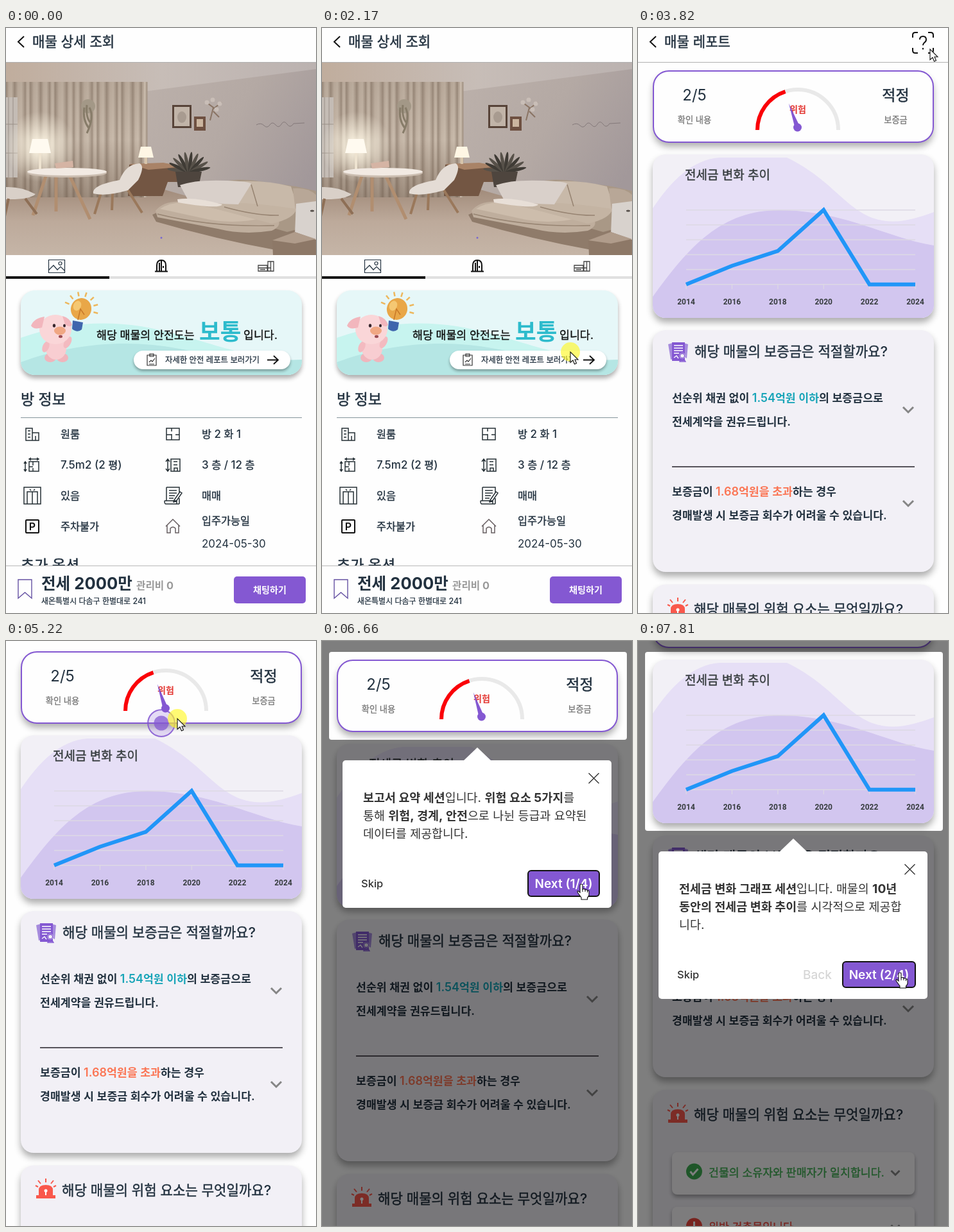
These frames come from a looping animation (483x912 px, 8000 ms). An HTML page with a canvas:

```html
<!DOCTYPE html>
<html lang="ko">
<head>
<meta charset="utf-8">
<style>
html, body { margin: 0; width: 100%; height: 100%; overflow: hidden; background: #fefefe; }
canvas { display: block; width: 483px; height: 912px; }
</style>
</head>
<body>
<canvas id="stage" width="483" height="912"></canvas>
<script>
const W = 483, H = 912, LOOP = 8000;
const INK = '#22313f', PURPLE = '#8458d2', PANEL = '#f2f0f6';
const screen = document.getElementById('stage').getContext('2d');
const layer = document.createElement('canvas');
layer.width = W;
layer.height = H;
const layerCtx = layer.getContext('2d');
let g = screen;

const clamp = v => Math.max(0, Math.min(1, v));
const progress = (t, start, length) => clamp((t - start) / length);
const sine = p => (1 - Math.cos(Math.PI * p)) / 2;

function shape(d, color, x = 0, y = 0) {
  g.save();
  g.translate(x, y);
  g.fillStyle = color;
  g.fill(new Path2D(d));
  g.restore();
}

function line(d, color, width, x = 0, y = 0) {
  g.save();
  g.translate(x, y);
  g.strokeStyle = color;
  g.lineWidth = width;
  g.stroke(new Path2D(d));
  g.restore();
}

function ellipse(x, y, rx, ry, color, turn = 0) {
  g.beginPath();
  g.ellipse(x, y, rx, ry, turn, 0, 7);
  g.fillStyle = color;
  g.fill();
}

function rect(x, y, w, h, color) {
  g.fillStyle = color;
  g.fillRect(x, y, w, h);
}

function gradient(x0, y0, x1, y1, ...colors) {
  const fill = g.createLinearGradient(x0, y0, x1, y1);
  colors.forEach((color, i) => fill.addColorStop(i / (colors.length - 1), color));
  return fill;
}

function box(x, y, w, h, r, fill, shadow = 0, border) {
  g.save();
  g.beginPath();
  g.roundRect(x, y, w, h, r);
  if (shadow) {
    g.shadowColor = 'rgba(0,0,0,.32)';
    g.shadowBlur = shadow * 1.5;
    g.shadowOffsetY = shadow;
  }
  g.fillStyle = fill;
  g.fill();
  g.shadowColor = 'transparent';
  if (border) {
    g.strokeStyle = border;
    g.lineWidth = 2;
    g.stroke();
  }
  g.restore();
}

// Hangul is set slightly smaller than Latin; medium Hangul is regular with a thin outline.
function text(str, x, y, size, weight = 400, color = INK, centered = false) {
  const runs = str.match(/[가-힣]+|[^가-힣]+/g).map(s => {
    const hangul = /[가-힣]/.test(s);
    const font = hangul
      ? `${weight} ${size * .96}px "Noto Sans CJK KR", "Noto Sans CJK JP", sans-serif`
      : `${weight} ${size}px Inter, sans-serif`;
    g.font = font;
    return { s, font, hangul, w: g.measureText(s).width };
  });
  if (centered) x -= runs.reduce((sum, run) => sum + run.w, 0) / 2;
  g.fillStyle = g.strokeStyle = color;
  g.lineWidth = size * .02;
  for (const run of runs) {
    g.font = run.font;
    g.fillText(run.s, x, y);
    if (run.hangul && weight === 500) g.strokeText(run.s, x, y);
    x += run.w;
  }
  return x;
}

function rich(x, y, size, parts) {
  for (const [str, weight, color] of parts) x = text(str, x, y, size, weight, color);
}

function header(title) {
  rect(0, 53, W, 1, '#b0b0b0');
  line('M28 13L19 21.5L28 30', '#111', 2);
  text(title, 41, 29, 22, 500);
}

function curtain() {
  for (let i = 0, x = 0; x < 214; i++) {
    const w = 13 + 5 * Math.sin(i * 2.3);
    rect(x, 84, w + 1, 180, gradient(x, 0, x + w, 0, '#9c8c7d', '#c3b4a5', '#c9bbac', '#a49485'));
    x += w;
  }
  rect(0, 84, 215, 180, gradient(0, 84, 0, 264, 'rgba(100,80,65,.15)', 'rgba(90,70,55,0)', 'rgba(90,70,55,.4)'));
  rect(0, 108, 18, 125, '#c4bcb5');
  line('M4 108V233M11 108V233M0 150H18M0 195H18', '#998f87', 1);
  ellipse(128, 122, 11, 11, '#a39887');
  line('M122 124Q119 143 129 156M130 124Q138 139 126 164M126 120Q124 140 132 148', '#877c69', 3);
}

function wallDecor() {
  rect(259, 120, 30, 36, '#574338');
  rect(262, 123, 24, 30, '#c1b4a8');
  ellipse(274, 139, 7, 9, '#a89b90');
  rect(293, 138, 18, 22, '#6e5041');
  rect(297, 142, 10, 12, '#cbb59f');
  line('M318 144L323 124L311 115M323 126L336 116M323 130L332 139', '#8a7464', 2);
  for (const [x, y] of [[313, 116], [322, 112], [333, 118], [328, 127]]) ellipse(x, y, 3.5, 3.5, '#c9beb7');
  line('M390 151Q397 147 402 152T411 151T420 151T429 150T438 150T448 149L465 148', '#84797a', 1);
}

function furniture() {
  const glow = g.createRadialGradient(53, 185, 4, 53, 185, 55);
  glow.addColorStop(0, 'rgba(255,248,230,.9)');
  glow.addColorStop(1, 'rgba(255,248,230,0)');
  rect(0, 130, 110, 110, glow);
  shape('M41 173H65L70 195H36Z', '#fffaf0');
  rect(51, 195, 4, 25, '#eee3d0');
  shape('M192 213L245 211L276 218V240H252L244 262H190Z', '#735643');
  shape('M192 212L245 210L278 216L222 221Z', '#a98367');
  shape('M210 185H226L230 202H206Z', '#fff6e4');
  rect(216, 202, 4, 10, '#d7c4aa');
  for (let i = 0; i < 10; i++) {
    const a = -3 + i * .31;
    ellipse(285 + 17 * Math.cos(a), 224 + 14 * Math.sin(a), 17, 2.7, i % 2 ? '#3f3b35' : '#575149', a);
  }
  shape('M264 224H305L300 248H268Z', '#4e453e');
  line('M62 231L42 292M100 232L131 298M78 232V286', '#b18e70', 5);
  ellipse(95, 226, 62, 7, '#cbbdb0');
  ellipse(95, 224, 62, 6, '#f2eae3');
  shape('M76 211L104 207L105 217L78 219Z', '#d5b4a4');
  shape('M0 248Q24 247 46 259Q36 268 0 267Z', '#d9d0c8');
  line('M4 266L-3 298M30 266L48 290', '#8e6f56', 4);
  line('M148 257L138 290M166 258L165 284M190 253L212 288', '#9a785b', 4);
  shape('M177 237Q187 212 208 211Q217 215 206 237L190 253Q155 263 136 258Q133 245 177 237Z', '#e4dcd5');
}

function sofa() {
  shape('M228 291L262 276L420 300L483 306V336L420 346Q330 330 234 302Z', '#8f7b6a');
  shape('M322 247Q340 234 380 237L452 247L483 254V306L438 318L340 290Z', '#a99886');
  shape('M324 243Q390 233 444 247L456 284Q404 288 352 276Z', '#c8b9a9');
  shape('M447 250Q470 248 483 260V296L452 294Z', '#b8a797');
  shape('M233 285Q246 269 273 271L424 298Q430 309 414 316Q370 323 330 313L236 295Z', '#bfae9d');
  shape('M240 282Q256 271 279 272L400 296Q360 306 318 299Z', '#cdbdac');
  shape('M304 276Q360 267 452 282Q450 297 414 305Z', '#c4b4a3');
  line('M236 290Q320 311 418 308M340 279Q390 293 425 292M382 244L392 278', '#968371', 1.5);
  shape('M271 245Q295 236 344 238Q380 239 382 243L362 275Q318 274 283 267Z', '#d9d0ca');
  shape('M267 267Q295 263 337 275Q333 283 268 272Z', '#e8dfd7');
  shape('M452 274L483 270V331L450 322Z', '#d8d2cd');
  ellipse(477, 285, 3, 1.5, '#554e49');
  shape('M415 331L450 318L483 330V354H416Z', '#8d7867');
  shape('M415 331L450 318L483 329L450 336Z', '#b09c8b');
}

function photo() {
  g.save();
  g.beginPath();
  g.rect(0, 54, W, 300);
  g.clip();
  rect(0, 54, W, 300, gradient(215, 90, 470, 240, '#bbb0aa', '#b4a9a4', '#a2989a'));
  shape('M0 54H483V64L215 99L0 84Z', gradient(0, 0, 483, 0, '#c0ad9d', '#c7bdb7', '#bbb2b0'));
  shape('M0 262L240 250L483 320V354H0Z', gradient(0, 250, 0, 354, '#a18b7a', '#bdaa9b', '#c5b5a7'));
  curtain();
  wallDecor();
  furniture();
  sofa();
  ellipse(242, 327, 1.5, 1.5, '#7666d0');
  g.restore();
}

function tabs() {
  rect(0, 387, W, 4, '#e0e0e0');
  rect(0, 387, 161, 4, '#111');
  line('M-12.5 -9.5H12.5V10.5H-12.5ZM-12 6L-5 -1L1 6L6 1L12 7M8 -4A2.5 2.5 0 1 1 3 -4A2.5 2.5 0 1 1 8 -4', INK, 1.2, 79, 371);
  line('M-7 8V-1Q-7 -9 0 -9Q7 -9 7 -1V8M-10 8.5H10M0 -9V8M-3 8V-5M3 0V3', '#111', 2, 242, 371);
  line('M-12 -1H2V8H-12ZM-12 3H2M-9 5.5H-1M3 -7H12V8H3ZM7.5 -7V8M3 3H7.5', '#444', 1.3, 405, 371);
}

function mascot() {
  for (let i = 0; i < 7; i++) {
    const a = -2.75 + i * .5, c = Math.cos(a), s = Math.sin(a);
    line(`M${20 * c} ${20 * s}L${27 * c} ${27 * s}`, '#edb75c', 2.5, 117, 438);
  }
  shape('M104 456L120 459L118 470Q111 476 103 469Z', '#3f66ad');
  ellipse(117, 438, 16, 17, '#e9a748', .3);
  ellipse(111, 433, 6, 8, '#f5c873', .4);
  line('M112 455L116 438L122 447', '#c87828', 1.5);
  ellipse(69, 514, 9, 7, '#f0b5bc');
  ellipse(88, 514, 9, 7, '#f0b5bc');
  ellipse(78, 500, 16, 17, '#f8cdd1');
  ellipse(62, 497, 5, 9, '#f3bac0', .4);
  ellipse(96, 490, 5, 10, '#f3bac0', .5);
  ellipse(77, 470, 25, 23, '#fad6d8');
  shape('M60 450Q44 452 39 464Q43 471 56 467ZM88 449Q100 452 103 463Q99 468 92 462Z', '#f2b6bd');
  ellipse(84, 472, 9, 6.5, '#f0a783');
  ellipse(75, 464, 2.2, 2.8, '#36262c');
  ellipse(91, 464, 2, 2.6, '#36262c');
  ellipse(85, 481, 3, 2.2, '#9b4b52');
}

function banner() {
  box(23, 409, 438, 132, 22, '#e6f7f8', 5);
  g.save();
  g.beginPath();
  g.roundRect(23, 409, 438, 132, 22);
  g.clip();
  shape('M23 483C90 460 150 456 210 465C300 480 350 512 461 520V541H23Z', '#c7f4ef');
  shape('M23 521C100 492 190 484 270 500C340 514 400 520 461 517V541H23Z', '#b5e6e4');
  g.restore();
  mascot();
  text('해당 매물의 안전도는', 141, 485, 18, 500, '#111');
  text('보통', 301, 486, 37, 700, '#2dbbcc');
  text('입니다.', 370, 485, 18, 500, '#111');
  box(199, 503, 244, 29, 14.5, '#fff', 3);
  line('M-7 -7H7V9H-7ZM-3 -9H3V-5H-3ZM-4 4L-1 1L1 3L5 -2M-4 7H4', '#333', 1.2, 227, 517);
  text('자세한 안전 레포트 보러가기', 248, 521.5, 12.9, 500);
  line('M407 517.5H424M417 511L424 517.5L417 524', '#111', 1.8);
}

function roomInfo() {
  text('방 정보', 23, 587, 24, 500);
  rect(23, 607, 438, 1, '#84949b');
  const icons = [
    [41, 633, 'M-10 -9H0V10H-10ZM0 -2H10V10H0M-7 -5H-3M-7 0H-3M-7 5H-3M5 3V10'],
    [260, 633, 'M-10 -9H10V9H-10ZM-2 -9V-4M-2 0V9M-10 1H-2M4 1H10'],
    [41, 681, 'M-5 -5H10V10H-5ZM1 -5V1M1 5V10M-5 3H1M-11 -5V10M-13 -2L-11 -5L-9 -2M-13 7L-11 10L-9 7M-5 -9H10M-2 -11L-5 -9L-2 -7M7 -11L10 -9L7 -7'],
    [260, 681, 'M-3 -9H11V10H-3ZM1 -5H7M1 0H7M2 10V5H7V10M-8 -9V10M-11 -5L-8 -9L-5 -5M-11 6L-8 10L-5 6'],
    [41, 729, 'M-13 -13H13V13H-13ZM-8 13V-6H8V13M0 -6V13M-4 -10L-2 -8M4 -10L2 -8'],
    [260, 729, 'M-10 -13H10V-4M-10 -13V8M10 4V13M-13 8H6V13H-11Q-13 13 -13 8M6 13H10M-6 -8H6M-6 -4H6M-6 0H3M-6 4H1M2 7L11 -6L14 -4L5 9L1 10Z'],
    [260, 777, 'M-11 0L0 -11L11 0M-9 -2V10H-4V3Q0 -1 4 3V10H9V-2']
  ];
  icons.forEach(([x, y, d], i) => line(d, i === 6 ? '#675f61' : '#263036', 1.5, x, y));
  box(31, 767, 20, 20, 1, '#fff', 0, '#111');
  text('P', 41, 783, 16, 600, '#111', true);
  const rows = [['원룸', '방 2 화 1'], ['7.5m2 (2 평)', '3 층 / 12 층'], ['있음', '매매'], ['주차불가', '']];
  rows.forEach(([left, right], i) => {
    text(left, 85, 639 + i * 48, 17, 500);
    if (right) text(right, 305, 639 + i * 48, 17, 500);
  });
  text('입주가능일', 305, 774, 17, 500);
  text('2024-05-30', 305, 810, 17, 400);
  text('추가 옵션', 23, 846, 24, 500);
}

function bottomBar() {
  rect(0, 838, W, 74, '#fefefe');
  rect(0, 838, W, 1, '#b8b8b8');
  line('M19 860H40V889L29.5 880L19 889Z', '#6552a3', 1.4);
  text('전세 2000만', 55, 875, 25.6, 700);
  text('관리비 0', 203, 875, 16.3, 700, '#999');
  text('새온특별시 다솜구 한별대로 241', 55, 898, 12.5, 500);
  box(355, 855, 112, 42, 5, PURPLE);
  text('채팅하기', 411, 881, 14.7, 700, '#fff', true);
}

function detailPage() {
  header('매물 상세 조회');
  photo();
  tabs();
  banner();
  roomInfo();
  bottomBar();
}

function helpIcon() {
  line('M-16 -8V-12Q-16 -16 -12 -16H-8M8 -16H12Q16 -16 16 -12V-8M16 8V12Q16 16 12 16H8M-8 16H-12Q-16 16 -16 12V8', '#111', 2, 444, 23);
  line('M-5 -5Q-5 -10 0 -10Q5 -10 5 -5Q5 -2 2 0Q0 1.5 0 4M0 8V10.5', '#111', 2, 444, 23);
}

function gauge(t) {
  const p = progress(t, 2730, 3000);
  const swing = p ? 1 - Math.pow(2, -10 * p) * Math.cos(2 * Math.PI * p / .3) : 0;
  const angle = Math.PI * (1 + .397 * swing);
  const arc = (from, to, color) => {
    g.beginPath();
    g.arc(249, 159, 63, Math.PI * from, Math.PI * to);
    g.strokeStyle = color;
    g.lineWidth = 6;
    g.stroke();
  };
  arc(1, 2, '#e9e9e9');
  arc(1, 1.4, '#fb0007');
  text('위험', 249, 132, 14.7, 700, '#e43a35', true);
  g.save();
  g.translate(248.5, 155);
  g.rotate(angle);
  shape('M0 -4L40 0L0 4Z', PURPLE);
  g.restore();
  ellipse(248.5, 155, 6.5, 6.5, PURPLE);
}

function chart(t) {
  box(23, 197, 438, 255, 20, PANEL, 7);
  g.save();
  g.beginPath();
  g.roundRect(23, 197, 438, 255, 20);
  g.clip();
  shape('M23 281C50 240 85 204 128 202H232C300 235 320 278 365 296C400 308 430 298 461 287V452H23Z', '#e6dff6');
  shape('M23 419C80 340 130 284 220 284C320 284 390 328 461 339V452H23Z', '#d2c6ef');
  g.restore();
  text('전세금 변화 추이', 73, 236, 19.8, 500, '#373d3f');
  for (let i = 0; i < 6; i++) rect(75, 283 + i * 23.2, 357, 1.5, '#ddd9e4');
  const grow = sine(progress(t, 2320, 750));
  const heights = [0, 29, 52, 116, 0, 0];
  g.beginPath();
  heights.forEach((h, i) => {
    const x = 75 + i * 71.4;
    rect(x - .5, 400, 1.2, 7, '#ddd9e4');
    g.lineTo(x, 399.7 - h * grow);
  });
  g.strokeStyle = '#2196f8';
  g.lineWidth = 6;
  g.stroke();
  g.font = '700 12px Roboto, sans-serif';
  g.textAlign = 'center';
  g.fillStyle = '#373d3f';
  heights.forEach((h, i) => g.fillText(2014 + i * 2, 75 + i * 71.4, 430.5));
  g.textAlign = 'left';
}

function chevron(x, y, r = 8) {
  line(`M${-r} ${-r / 2}L0 ${r / 2}L${r} ${-r / 2}`, '#858585', 3, x, y);
}

function depositCard() {
  box(23, 471, 438, 377, 20, PANEL, 7);
  shape('M47 493L54 491V516L51 517ZM78 493L71 491V512L76 515Z', '#a68bdd');
  shape('M53 490H73V519H53Z', PURPLE);
  line('M56 495H70M56 499H70M56 503H70M56 507H64M56 514L60 511L63 515', '#fff', 1.3);
  ellipse(69, 511, 4.5, 4.5, '#f2f0f6');
  line('M72.5 511A3.5 3.5 0 1 1 65.5 511A3.5 3.5 0 1 1 72.5 511M67 515L65 520H74L71 515', PURPLE, 1.3);
  text('해당 매물의 보증금은 적절할까요?', 88, 512, 22, 500);
  rich(53, 583, 18, [['선순위 채권 없이 ', 600], ['1.54억원 이하', 600, '#19a5b8'], ['의 보증금으로', 600]]);
  text('전세계약을 권유드립니다.', 53, 620, 18, 600);
  rect(53, 683, 378, 2, '#56535a');
  rich(53, 729, 18, [['보증금이 ', 600], ['1.68억원을 초과', 600, '#fb7554'], ['하는 경우', 600]]);
  text('경매발생 시 보증금 회수가 어려울 수 있습니다.', 53, 766, 18, 600);
  chevron(421, 595);
  chevron(421, 741);
}

function riskItem(y, color, mark, label) {
  box(53, y, 378, 66, 8, '#fbfafc', 4);
  ellipse(87.5, y + 30, 12.5, 12.5, color);
  line(mark, '#fff', 3, 87.5, y + 30);
  text(label, 110, y + 38, 18, 500, color);
  chevron(401, y + 32, 6.5);
}

function riskCard() {
  box(23, 867.5, 438, 420, 20, PANEL, 7);
  shape('M51 914V906Q51 898 62 898Q73 898 73 906V914H77V919H47V914Z', '#f9584c');
  line('M62 888V894M50 891L54 896M74 891L70 896M46 899L50 901M78 899L74 901', '#f9584c', 2);
  ellipse(62, 907, 2.5, 2.5, '#fff');
  rect(61, 908, 2, 6, '#fff');
  text('해당 매물의 위험 요소는 무엇일까요?', 87, 914, 22, 500);
  riskItem(965, '#3fae52', 'M-6 0L-2 5L6 -4', '건물의 소유자와 판매자가 일치합니다.');
  riskItem(1050, '#f0463c', 'M0 -7V2M0 4V7', '위반 건축물입니다.');
}

function scrollAt(t) {
  if (t < 3970) return 0;
  return Math.round(50 - 13 * sine(progress(t, 5590, 300)) + 131 * sine(progress(t, 7071, 300)));
}

function beacon(t) {
  const p = (t - 4350) / 1200 % 1;
  const scale = p < .45 ? 1 - .25 * sine(p / .45) : .75 + .25 * sine((p - .45) / .55);
  g.globalAlpha = .85;
  ellipse(242, 128, 25 * scale, 25 * scale, 'rgba(132,88,210,.25)');
  g.beginPath();
  g.arc(242, 128, 25 * scale - 1, 0, 7);
  g.strokeStyle = PURPLE;
  g.lineWidth = 2;
  g.stroke();
  g.globalAlpha = .75;
  ellipse(242, 128, 11.5, 11.5, PURPLE);
  g.globalAlpha = 1;
}

const steps = [
  {
    hole: [54, 137], tip: 223, next: 'Next (1/4)', start: 5775,
    lines: [
      [['보고서 요약 세션', 700], ['입니다. ', 400], ['위험 요소 5가지', 700], ['를', 400]],
      [['통해 ', 400], ['위험, 경계, 안전', 700], ['으로 나뉜 등급과 요약된', 400]],
      [['데이터를 제공합니다.', 400]]
    ]
  },
  {
    hole: [185, 279], tip: 496, next: 'Next (2/4)', start: 7010, back: true,
    lines: [
      [['전세금 변화 그래프 세션', 700], ['입니다. 매물의 ', 400], ['10년', 700]],
      [['동안의 전세금 변화 추이', 700], ['를 시각적으로 제공합', 400]],
      [['니다.', 400]]
    ]
  }
];

function tooltip(step, top) {
  box(32, top, 419, 230, 5, '#fff');
  shape('M220 1L242 -20L264 1Z', '#fff', 0, top);
  line('M-8 -8L8 8M8 -8L-8 8', '#333', 1.4, 423.5, top + 28);
  step.lines.forEach((parts, i) =>
    rich(64, top + 65 + i * 28, 19.2, parts.map(([s, w]) => [s, w, '#333'])));
  text('Skip', 61, top + 198, 16.5, 500, '#333');
  if (step.back) text('Back', 257, top + 199, 19, 500, '#d6d6d6');
  const left = step.back ? 319 : 321;
  box(left, top + 172, 432 - left, 40, 5, PURPLE, 0, '#111');
  text(step.next, (left + 432) / 2, top + 199, 19, 600, '#fff', true);
}

function tour(t, scroll) {
  const step = steps[t < 7020 ? 0 : 1];
  const [top, height] = step.hole;
  g.beginPath();
  g.rect(0, 0, W, H);
  g.roundRect(11, top - scroll, 464, height, 4);
  g.fillStyle = 'rgba(0,0,0,.5)';
  g.fill('evenodd');

  g = layerCtx;
  g.clearRect(0, 0, W, H);
  tooltip(step, step.tip - scroll);
  g = screen;
  g.globalAlpha = progress(t, step.start, 300);
  g.drawImage(layer, 0, 0);
  g.globalAlpha = 1;
}

function reportPage(t) {
  const scroll = scrollAt(t);
  g.save();
  g.translate(0, -scroll);
  if (t < 3970) {
    header('매물 레포트');
    helpIcon();
  }
  box(24, 67, 436, 111, 24, '#fefefe', 7, PURPLE);
  text('2/5', 88, 113, 24, 400, INK, true);
  text('적정', 401.5, 113, 24, 500, INK, true);
  text('확인 내용', 88, 148, 13.8, 500, '#757575', true);
  text('보증금', 401.5, 148, 13.8, 500, '#757575', true);
  gauge(t);
  chart(t);
  depositCard();
  riskCard();
  g.restore();
  if (t >= 4350 && t < 5590) beacon(t);
  if (t >= 5590) tour(t, scroll);
}

const path = [
  [130, 484, 914], [150, 470, 889], [890, 394, 523], [950, 394, 523], [1160, 387, 505], [2400, 387, 505],
  [3130, 432, 138], [3750, 455, 33], [4000, 455, 33], [4780, 315, 128], [5200, 267, 121], [5330, 267, 121],
  [5600, 256, 122], [5950, 256, 122], [6350, 415, 393], [6560, 415, 393], [6660, 404, 379], [7200, 404, 379],
  [7750, 408, 517], [8000, 408, 517]
];
const clicks = [[2170, 2320], [3920, 3970], [5200, 5330]];
const ARROW = 'M0 0V16.5L4 13L6.5 19L9.5 17.7L7 12H12Z';
const HAND = 'M-2 2Q-2 0 0 0Q2 0 2 2V8Q5 6.5 6 9Q9 8 9.5 10Q12 9.5 12 12V17Q11 20 9.5 21V24H0V21L-5 14Q-7 11 -5 10.5L-2 13Z';

function cursor(t) {
  const i = path.findIndex(point => point[0] > t);
  if (i < 1) return;
  const [t0, x0, y0] = path[i - 1], [t1, x1, y1] = path[i];
  const k = sine((t - t0) / (t1 - t0));
  const x = x0 + (x1 - x0) * k, y = y0 + (y1 - y0) * k;
  if (clicks.some(([from, to]) => t >= from && t < to)) ellipse(x, y, 15, 15, 'rgba(255,248,40,.65)');
  const pointing = t >= 5335;
  const d = pointing ? HAND : ARROW;
  shape(d, '#fff', x, y);
  line(d, '#111', 1.1, x, y);
  if (pointing) line('M2 8V12M6 9V12M9.5 10V13', '#111', 1, x, y);
}

function draw(t) {
  rect(0, 0, W, H, '#fefefe');
  if (t < 2320) detailPage();
  else reportPage(t);
  cursor(t);
}

let origin;
function tick(now) {
  origin ??= now;
  draw((now - origin) % LOOP);
  requestAnimationFrame(tick);
}
requestAnimationFrame(tick);
</script>
</body>
</html>
```
